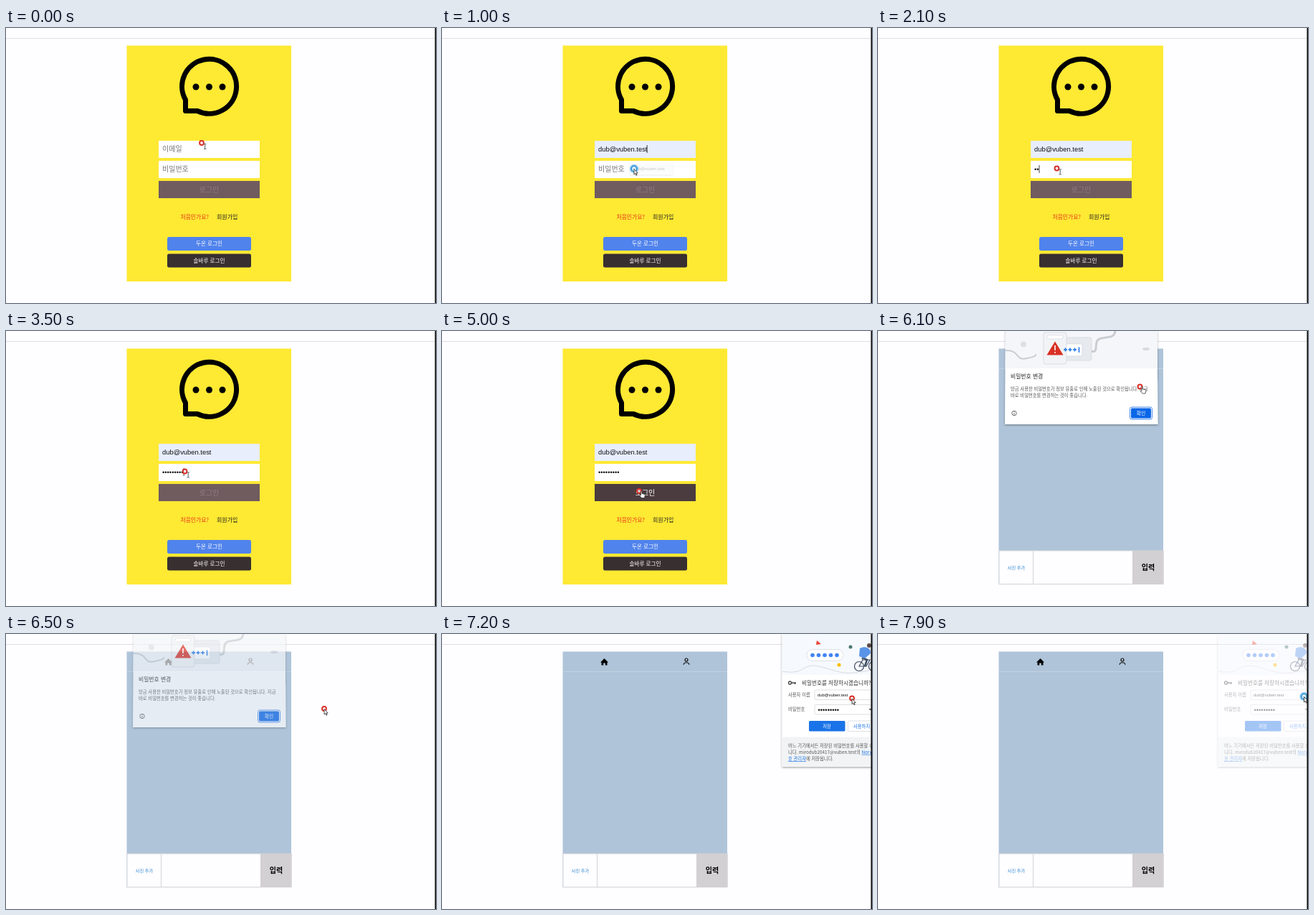
These frames come from a looping animation (600 by 383 pixels, 8 s). An HTML page:

```html
<!DOCTYPE html>
<html lang="ko">
<head>
<meta charset="utf-8">
<title>Login</title>
<style>
html, body { margin: 0; height: 100%; overflow: hidden; background: #fefdff; }
svg { display: block; width: 100vw; height: 100vh; }
text { font-family: "Noto Sans CJK KR", "Noto Sans CJK JP", "Noto Sans CJK", sans-serif; white-space: pre; }
.latin { font-family: "Liberation Sans", Arial, sans-serif; font-size: 9.4px; fill: #111; }
.mid { text-anchor: middle; }
.hint { font-size: 10px; fill: #777; }
.white { fill: #fff; }
.small { font-size: 6.3px; fill: #555; }
.line { fill: none; stroke: #c9cdd3; }
</style>
</head>
<body>
<svg viewBox="0 0 600 383">
  <defs>
    <filter id="shadow" x="-10%" y="-10%" width="120%" height="125%">
      <feDropShadow dx="0" dy="1" stdDeviation="1.5" flood-opacity=".4"/>
    </filter>
    <g id="house"><path d="M221 39.5 226.500 34 232 39.500H230.500V43.500H227.800V40.500H225.200V43.500H222.500V39.500Z"/></g>
  </defs>
  <rect width="600" height="383" fill="#fefdff"/>
  <path d="M0 14.500H600" stroke="#e0dee2"/>

  <g id="login">
    <rect x="168.500" y="24.500" width="229.500" height="328.500" fill="#fee933"/>
    <path d="M267 115.500H250.500V100A38 38 0 1 1 267 115.500Z" fill="none" stroke="#000" stroke-width="7" stroke-linejoin="round"/>
    <circle cx="265" cy="82" r="4.500"/><circle cx="283.500" cy="82" r="4.500"/><circle cx="302" cy="82" r="4.500"/>
    <rect id="mailBox" x="213" y="157" width="141" height="24"/>
    <text id="mailHint" class="hint" x="218" y="172">이메일</text>
    <text id="mail" class="latin" x="218" y="172">dub@vuben.test</text>
    <rect x="213" y="185" width="141" height="24" fill="#fff"/>
    <text id="passHint" class="hint" x="218" y="200">비밀번호</text>
    <text id="pass" class="latin" x="218" y="200"></text>
    <rect id="caret" width=".8" height="11" fill="#111"/>
    <rect id="enter" x="213" y="213" width="141" height="24"/>
    <text id="enterText" class="mid" x="283.500" y="229" font-size="10">로그인</text>
    <text x="243.500" y="266" font-size="7.800" fill="#e8321c">처음인가요?</text>
    <text x="294" y="266" font-size="8" fill="#222">회원가입</text>
    <rect x="225" y="291" width="117" height="19" rx="2.500" fill="#5083ec"/>
    <text class="mid white" x="283.500" y="303.300" font-size="7.600">두온 로그인</text>
    <rect x="225" y="314.500" width="117" height="19" rx="2.500" fill="#382f31"/>
    <text class="mid white" x="283.500" y="326.800" font-size="7.600">솔바루 로그인</text>
  </g>

  <g id="chat">
    <rect x="168.500" y="24.500" width="229.500" height="328" fill="#afc4d9"/>
    <path d="M169 52.500H398" stroke="#c3d2e2"/>
    <use href="#house"/>
    <g fill="none" stroke="#111" stroke-width="1.200"><circle cx="341" cy="36" r="2"/><path d="M337.200 42.800C337.200 38.700 344.800 38.700 344.800 42.800"/></g>
    <rect x="169" y="306" width="229" height="46.500" fill="#fefdff" stroke="#d3d5da"/>
    <path d="M216.500 306V352" stroke="#d3d5da"/>
    <rect x="355" y="306" width="43.500" height="47" fill="#d2d0d2"/>
    <text class="mid" x="193" y="331.500" font-size="6.200" fill="#2f86d0">사진 추가</text>
    <text class="mid" x="377" y="333" font-size="10" font-weight="700">입력</text>
  </g>

  <g id="alert">
    <path d="M179 0H388.500V59H179Z" fill="#fff" filter="url(#shadow)"/>
    <text x="186" y="13.500" font-size="7" fill="#333">pilothost:3000 내용:</text>
    <text class="small" x="186" y="26.500" style="fill:#444">로그인 되었습니다. 환영합니다.</text>
    <rect x="351" y="36.500" width="30.500" height="15.500" rx="2" fill="#fff" stroke="#4a8bea"/>
    <rect x="352.300" y="37.800" width="28" height="13" rx="1.500" fill="#1a6fe0"/>
    <text class="mid white" x="366.500" y="46.700" font-size="6.500">확인</text>
  </g>

  <g id="warn">
    <path d="M178 0H389.500L390.500 130H177Z" fill="#fff" filter="url(#shadow)"/>
    <path d="M178 0H389.500L390 52H177.500Z" fill="#f4f6f9"/>
    <path class="line" d="M178 27C200 27 190 42 208 38S217 34 221 33" stroke-width="2"/>
    <path class="line" d="M298 28C310 32 298 12 312 10S330 8 331 0" stroke-width="3"/>
    <circle cx="203" cy="18.500" r="4" fill="#dde1e6"/>
    <ellipse cx="374" cy="25" rx="5" ry="2" fill="#d5dae0"/>
    <rect x="256" y="9" width="42" height="32" rx="3" fill="#e6eaef" stroke="#d0d5db" stroke-width=".7"/>
    <rect x="252" y="18" width="33" height="17" rx="2" fill="#fff" stroke="#d0d5db" stroke-width=".7"/>
    <rect x="231" y="2" width="32" height="44" rx="3" fill="#f1f3f6" stroke="#d0d5db" stroke-width=".7"/>
    <rect x="236" y="6" width="22" height="5" rx="2" fill="#fff" stroke="#d0d5db" stroke-width=".6"/>
    <path d="M247 14.500 258.500 33.500H235.500Z" fill="#d93025"/>
    <path d="M247 20V27M247 29V30.800" stroke="#fff" stroke-width="1.600"/>
    <path d="M259 26H264M265.500 26H270.500M272 26H277M261.500 23.500V28.500M268 23.500V28.500M274.500 23.500V28.500M280.500 22.500V30" stroke="#1a73e8" stroke-width="1.500"/>
    <text x="185" y="66" font-size="7.800" fill="#222">비밀번호 변경</text>
    <text class="small" x="185" y="82.700">방금 사용한 비밀번호가 정보 유출로 인해 노출된 것으로 확인됩니다. 지금</text>
    <text class="small" x="185" y="92">바로 비밀번호를 변경하는 것이 좋습니다.</text>
    <circle cx="190" cy="114.500" r="3.200" fill="none" stroke="#444" stroke-width=".8"/>
    <path d="M190 114V116.500M190 112.300V113.200" stroke="#444" stroke-width=".8"/>
    <rect x="351.500" y="106" width="31" height="17" rx="2.500" fill="#fff" stroke="#4a8bea"/>
    <rect x="353" y="107.500" width="28" height="14" rx="1.500" fill="#0a66e8"/>
    <text class="mid white" x="367" y="116.800" font-size="6.800">확인</text>
  </g>

  <g id="save">
    <path d="M474.500 0H604V185H474.500Z" fill="#fff" filter="url(#shadow)"/>
    <path d="M475 0H600V57H475Z" fill="#f6f9fd"/>
    <path d="M475 52C510 58 500 38 530 46S560 58 600 50" class="line" stroke-width=".7"/>
    <path d="M523 9 529 14 522 15Z" fill="#ea4335"/>
    <rect x="509" y="21.500" width="51" height="16" rx="8" fill="#fff" stroke="#d5dbe4" stroke-width=".8"/>
    <g id="saveDots" fill="#4285f4"></g>
    <circle cx="554" cy="43" r="2.500" fill="#fbbc04"/><circle cx="570" cy="18" r="2.500" fill="#4c7a74"/>
    <g fill="none" stroke="#3c4a60" stroke-width="1.200">
      <circle cx="582" cy="45" r="6.500"/><circle cx="602" cy="45" r="6.500"/>
      <path d="M582 45 587 36H597L592 45ZM587 36 586 33"/>
      <path d="M587 33 593 36 590 45" stroke-width="2.500"/>
    </g>
    <path d="M583 20C592 15 599 21 598 27L590 34 582 31Z" fill="#5a94e8"/>
    <circle cx="596" cy="16" r="3" fill="#5b4a48"/>
    <g fill="none" stroke="#444" stroke-width="1.300"><circle cx="485.500" cy="68" r="2"/><path d="M487.500 68H494M492.500 68V70"/></g>
    <text x="502" y="70.800" font-size="7.600" fill="#333">비밀번호를 저장하시겠습니까?</text>
    <g fill="#fff" stroke="#ccd0d6" stroke-width=".7"><rect x="520" y="78" width="84" height="13.500" rx="1.500"/><rect x="520" y="98.500" width="84" height="13.500" rx="1.500"/></g>
    <text class="small" x="483" y="87">사용자 이름</text>
    <text class="small" x="483" y="107.300">비밀번호</text>
    <text class="latin" x="524" y="87" style="font-size:5.800px">dub@vuben.test</text>
    <text class="latin" x="524.500" y="108.500">•••••••••</text>
    <path d="M595.500 104H600L597.700 106.500Z" fill="#555"/>
    <rect x="512" y="121" width="50.500" height="14.500" rx="1.500" fill="#1a73e8"/>
    <text class="mid white" x="537" y="130.500" font-size="6.300">저장</text>
    <rect x="566.500" y="121" width="45" height="14.500" rx="1.500" fill="#fff" stroke="#d3d7dd" stroke-width=".8"/>
    <text x="574" y="130.500" font-size="6.300" fill="#1a73e8">사용하지 않음</text>
    <path d="M475 143.500H600V185H475Z" fill="#f1f3f4"/>
    <text class="small" x="483" y="157.500">어느 기기에서든 저장된 비밀번호를 사용할 수 있습</text>
    <text class="small" x="483" y="166.800">니다. mirodub20417@vuben.test의 <tspan fill="#1a73e8" text-decoration="underline">Norvel 비밀번</tspan></text>
    <text class="small" x="483" y="176"><tspan fill="#1a73e8" text-decoration="underline">호 관리자</tspan>에 저장됩니다.</text>
  </g>

  <g id="suggest">
    <rect x="262" y="186" width="60" height="18" rx="1.500" fill="#fff" filter="url(#shadow)"/>
    <rect x="262" y="188" width="60" height="14" fill="#eceef0"/>
    <text class="latin" x="267" y="197.800" style="font-size:6px">dub@vuben.test</text>
  </g>

  <g id="pointer">
    <circle id="idle" r="2.900" fill="#fff" fill-opacity=".6" stroke="#d9302a" stroke-width="2"/>
    <g id="press"><circle r="6.500" fill="#8cc8f0" opacity=".55"/><circle r="4" fill="#d5ecfa" stroke="#3d9bd8" stroke-width="2.200"/></g>
    <path id="beam" d="M3 1.300H4.200L4.700 1.800 5.200 1.300H6.400M4.700 1.800V8M3 8.500H4.200L4.700 8 5.200 8.500H6.400" fill="none" stroke="#444" stroke-width=".9"/>
    <path id="arrow" d="M0 .5V8L1.700 6.500 2.900 9.200 4.100 8.700 2.900 6.100H5.200Z" fill="#fff" stroke="#222" stroke-width=".8"/>
    <path id="hand" d="M2.500 6V1C2.500-.2 4-.2 4 1V3.500L7.500 4.300Q8.500 4.600 8.300 6L7.500 9.500H3.500L.7 6.300Q.7 5 2.500 6Z" fill="#fff" stroke="#222" stroke-width=".7"/>
  </g>
  <rect x="598.500" width="1.500" height="383" fill="#080808"/>
</svg>
<script>
const LOOP = 8000, STEP = 100;
// time, x, y of the pointer
const path = [
  [0, 273, 160], [300, 273, 160], [700, 268, 196], [1050, 268, 196],
  [1500, 249.5, 195.5], [4050, 249.5, 195.5], [4600, 275, 223], [5200, 275, 223],
  [5750, 365, 43], [5950, 365, 43], [6250, 366, 112], [6350, 366, 112],
  [6500, 444, 104], [6600, 451, 103], [7400, 594.5, 87], [LOOP, 594.5, 87]
];
const clicks = [[100, 250], [900, 1100], [1500, 1650], [5050, 5200], [5850, 6000], [6300, 6400], [7700, 8000]];
const el = {};
document.querySelectorAll('svg [id]').forEach(e => el[e.id] = e);
el.saveDots.innerHTML = [0, 1, 2, 3, 4].map(i => `<circle cx="${517 + i * 8.5}" cy="29.500" r="2.800"/>`).join('');

const ramp = (t, a, b) => Math.min(1, Math.max(0, (t - a) / (b - a)));
const within = (t, a, b) => t >= a && t < b;
const show = (e, alpha) => e.setAttribute('opacity', +alpha);
const fade = (t, inAt, outAt, outEnd) => ramp(t, inAt - 100, inAt) * (1 - ramp(t, outAt, outEnd));
const mix = (a, b, k) => `rgb(${a.map((v, i) => Math.round(v + (b[i] - v) * k))})`;

function position(t) {
  const i = path.findIndex((p, n) => t < path[n + 1][0]);
  const [a, x, y] = path[i], [b, u, v] = path[i + 1];
  const k = ramp(t, a, b), s = k * k * (3 - 2 * k);
  return [x + (u - x) * s, y + (v - y) * s];
}

function pointerKind(t, x, y) {
  if (t >= 5800 && t < 6400) return 'hand';
  if (t > 5250 || x < 213 || x > 354) return 'arrow';
  if (y >= 213 && y < 237) return 'hand';
  if (within(t, 300, 1100) && y > 181) return 'arrow';
  return within(y, 157, 181) || within(y, 185, 209) ? 'beam' : 'arrow';
}

function draw(t) {
  const filled = t >= 700, chat = t >= 6000;
  const dots = Math.min(9, Math.max(0, Math.floor((t - 1700) / 200)));
  show(el.login, !chat);
  show(el.chat, chat);
  show(el.mailHint, !filled);
  show(el.mail, filled);
  el.mailBox.setAttribute('fill', filled ? '#e8eefc' : '#fff');
  show(el.passHint, !dots);
  el.pass.textContent = '•'.repeat(dots);

  const inPass = t >= 1500;
  el.caret.setAttribute('x', inPass ? 218 + dots * 3.3 : filled ? 285.7 : 218);
  el.caret.setAttribute('y', inPass ? 191 : 163);
  show(el.caret, within(t, 200, 4000));

  const ready = ramp(t, 4000, 4400);
  el.enter.setAttribute('fill', mix([112, 91, 95], [75, 60, 63], ready));
  el.enterText.setAttribute('fill', mix([143, 126, 129], [255, 255, 255], ready));

  show(el.suggest, fade(t, 300, 900, 1030));
  show(el.alert, fade(t, 5300, 5900, 6000));
  show(el.warn, fade(t, 6100, 6400, 6720));
  show(el.save, fade(t, 7000, 7700, 8030));

  const [x, y] = position(t), kind = pointerKind(t, x, y);
  const pressed = clicks.some(([a, b]) => within(t, a, b));
  el.pointer.setAttribute('transform', `translate(${x} ${y})`);
  show(el.idle, !pressed);
  show(el.press, pressed);
  for (const k of ['beam', 'arrow', 'hand']) show(el[k], k === kind);
}

const start = performance.now();
function tick() {
  const t = (performance.now() - start) % LOOP;
  draw(Math.floor(t / STEP) * STEP);
  requestAnimationFrame(tick);
}
tick();
</script>
</body>
</html>
```
